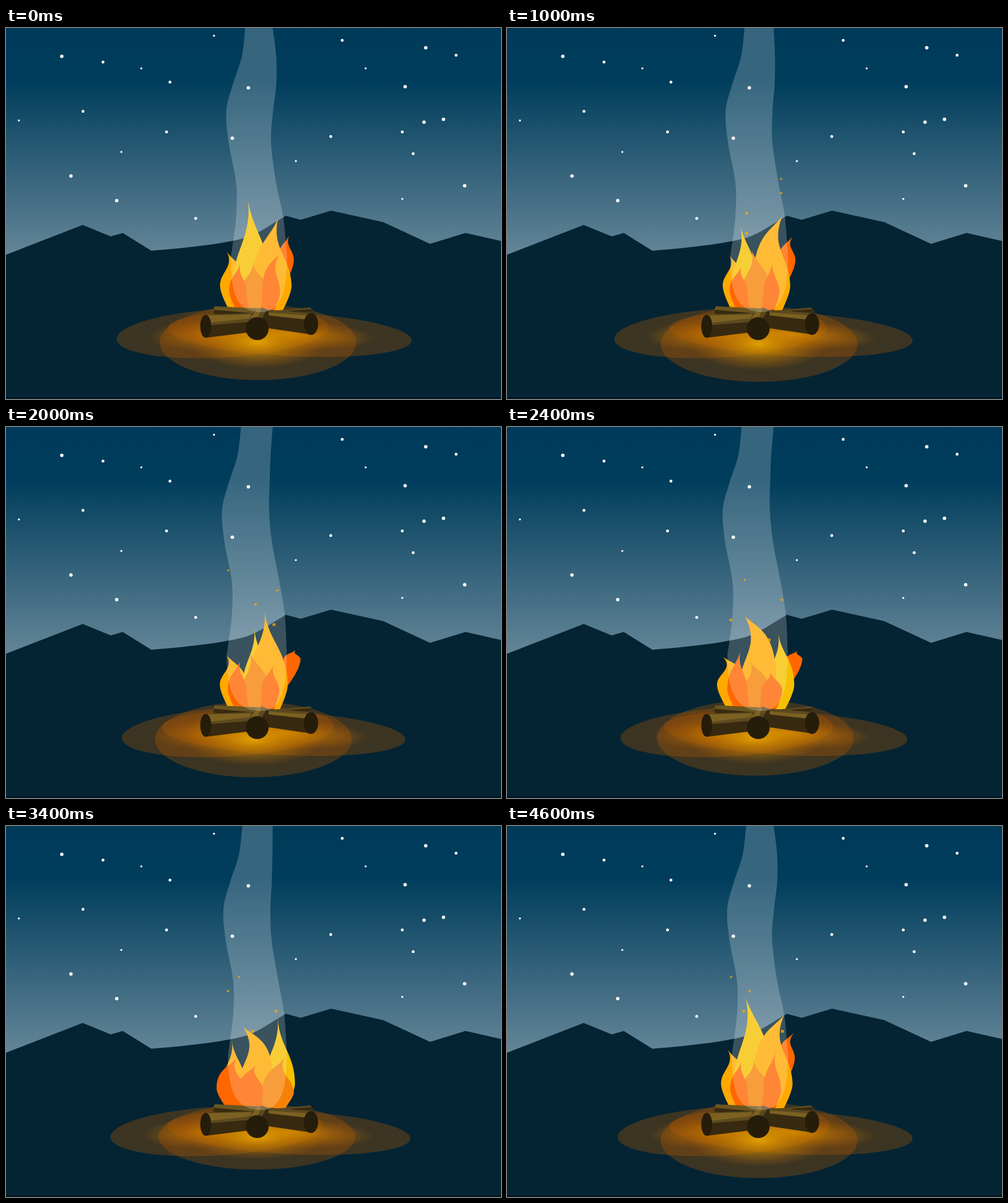
Write an HTML page with a canvas that moves like this. It is 865x648 px and loops after 4800 ms.

```html
<!DOCTYPE html>
<html lang="en">
<head>
<meta charset="utf-8">
<title>Campfire at night</title>
<style>
html, body { margin: 0; width: 100%; height: 100%; overflow: hidden; background: #042433; }
canvas { display: block; }
</style>
</head>
<body>
<canvas id="stage" width="865" height="648"></canvas>
<script>
const ctx = document.getElementById('stage').getContext('2d');
const LOOP = 4800, STEP = 200, BASE = 493, CENTRE = 438;

// Back to front: height of the widest part, pull of the foot towards the centre, tip flicker
const FLAMES = [
  { color: '#ff6600', belly: 405, foot: 0.75, flicker: 3 },
  { color: '#ffa900', belly: 450, foot: 0.25, flicker: 0 },
  { color: '#f6c000', belly: 450, foot: 0.25, flicker: -3 },
  { color: '#ffa900', belly: 450, foot: 0.25, flicker: 4 },
  { color: '#f58207', belly: 465, foot: 0.25, flicker: 0 },
  { color: '#ff6600', belly: 458, foot: 0.25, flicker: 0 },
  { color: '#ff6600', belly: 460, foot: 0.25, flicker: -4 }
];

// Each flame: tip x, tip y, left and right extent
const tall = [[498, 362, 474, 503], [386, 391, 374, 420], [420, 299, 396, 462], [480, 331, 430, 499],
  [431, 408, 405, 462], [410, 411, 390, 420], [474, 395, 448, 479]];
const low = [[496, 365, 474, 504], [389, 397, 377, 420], [411, 346, 393, 438], [477, 329, 430, 495],
  [427, 387, 408, 462], [410, 416, 389, 420], [468, 409, 448, 476]];
const reach = Object.assign([...low], { 0: [509, 389, 484, 514], 3: [474, 316, 426, 503] });
const curl = [[511, 391, 488, 516], [378, 402, 367, 420], [471, 361, 455, 502], [420, 331, 407, 471],
  [424, 409, 410, 460], [408, 391, 385, 420], [456, 427, 444, 481]];
const round = [[478, 400, 470, 488], [395, 376, 378, 418], [478, 337, 450, 505], [411, 352, 408, 467],
  [487, 405, 447, 503], [404, 405, 368, 415], [441, 417, 405, 449]];

// Glow: left tip, right tip, front pool centre and height
const POSES = {
  tall: { fire: tall, glow: [193, 709, 440.5, 549, 66] },
  low: { fire: low, glow: [187, 709, 440.5, 552, 66] },
  lean: { fire: low, glow: [204, 707, 436, 547.5, 66] },
  reach: { fire: reach, glow: [204, 697, 431.5, 547, 66] },
  curl: { fire: curl, glow: [198, 700, 434, 543, 66] },
  round: { fire: round, glow: [182, 707, 438.5, 543, 57] }
};
const TIMELINE = [[0, 'tall'], [600, 'tall'], [1000, 'low'], [1600, 'lean'], [1800, 'reach'],
  [2400, 'curl'], [2600, 'curl'], [3000, 'round'], [3400, 'round'], [3800, 'curl'], [4000, 'reach'],
  [4200, 'lean'], [4400, 'low'], [4600, 'tall'], [LOOP, 'tall']];

const STARS = [
  [1.8, [[236, 70], [363, 13], [22, 161], [201, 216], [506, 232], [628, 70], [692, 298]]],
  [2.5, [[169, 59], [286, 94], [134, 145], [280, 181], [331, 332], [587, 21], [786, 47], [692, 181],
    [567, 189], [711, 219]]],
  [3, [[97, 49], [113, 258], [193, 301], [423, 104], [395, 192], [733, 34], [697, 102], [764, 159],
    [730, 164], [801, 275]]]
];

const fill = (color, path) => { ctx.fillStyle = color; ctx.fill(new Path2D(path)); };
const poly = (color, points) => fill(color, `M${points}Z`);
function oval(color, x, y, rx, ry = rx) {
  ctx.fillStyle = color;
  ctx.beginPath();
  ctx.ellipse(x, y, rx, ry, 0, 0, 7);
  ctx.fill();
}

const sky = ctx.createLinearGradient(0, 0, 0, 400);
sky.addColorStop(0, '#003a5a');
sky.addColorStop(0.23, '#003d5c');
sky.addColorStop(1, '#658698');

const light = ctx.createRadialGradient(0, 0, 0, 0, 0, 1);
light.addColorStop(0, 'rgba(224,160,0,1)');
light.addColorStop(0.7, 'rgba(175,86,0,.33)');
light.addColorStop(1, 'rgba(175,86,0,.33)');

function drawScenery() {
  ctx.fillStyle = sky;
  ctx.fillRect(0, 0, 865, 648);
  for (const [r, places] of STARS) {
    for (const [x, y] of places) oval('#fff', x + 0.5, y + 0.5, r);
  }
  fill('#042433', `M0 396L134 344 183 364 204 358 254 389C330 383 390 375 420 366
    C445 357 460 345 489 328L515 335 568 319 659 339 741 377 803 358 865 372V648H0Z`);
  ctx.fillStyle = '#021722';
  ctx.fillRect(0, 645, 865, 3);
}

function pool(x, y, rx, ry, angle) {
  ctx.save();
  ctx.translate(x, y);
  ctx.rotate(angle);
  ctx.scale(rx, ry);
  oval(light, 0, 0, 1);
  ctx.restore();
}

function drawGlow([left, right, x, y, height]) {
  pool(left + 186, 533, 186, 42.5, -0.058);
  pool(right - 213, 535, 213, 38, 0.052);
  pool(x, y, 172, height, 0);
}

// The tip curls away from the middle; the outer side of the curl is rounder
function drawFlame([tipX, tipY, left, right], { color, belly, foot }) {
  const height = belly - tipY, bend = 1.2 * (tipX - (left + right) / 2);
  const side = (x, sign) => {
    const bulge = Math.min(1, Math.max(0, sign * bend / 25));
    return {
      x,
      foot: x + (CENTRE - x) * foot,
      footY: belly + 0.3 * (BASE - belly),
      rise: belly - height * (0.4 + 0.35 * bulge),
      drop: tipY + height * (0.45 - 0.25 * bulge)
    };
  };
  const l = side(left, 1), r = side(right, -1), neck = tipX - bend;
  fill(color, `M${l.foot} ${BASE}Q${left} ${l.footY} ${left} ${belly}
    C${left} ${l.rise} ${neck} ${l.drop} ${tipX} ${tipY}
    C${neck} ${r.drop} ${right} ${r.rise} ${right} ${belly}
    Q${right} ${r.footY} ${r.foot} ${BASE}Z`);
}

function drawLogs() {
  // back pair
  poly('#5c4a1e', '478 493 531 488 538 495 510 500');
  poly('#382a10', '495 494 533 491 538 495 510 500');
  poly('#382a10', '365 486 440 492 440 510 362 499');
  poly('#6b5520', '365 486 447 490 440 499 362 492');
  // left
  poly('#382a10', '349 501 430 498 430 531 350 541');
  poly('#5c4a1e', '349 501 430 498 430 513 357 519');
  poly('#7c6122', '349 502 430 500 425 507 356 515');
  oval('#261c0a', 349, 521, 9.5, 20);
  // right
  poly('#382a10', '457 492 535 498 531 535 456 524');
  poly('#5c4a1e', '457 492 535 498 524 506 457 500');
  poly('#7c6122', '459 497 527 502 522 509 459 502');
  oval('#261c0a', 533, 517, 12.5, 19);
  // front
  poly('#5c4a1e', '419 523 435 493 447 488 459 493 459 524');
  poly('#7c6122', '425 511 438 491 447 489 440 506');
  poly('#382a10', '448 506 455 493 459 495 459 522');
  oval('#261c0a', 439, 525, 20);
}

// Smooth curve through points, appended to the current path
function curve(points) {
  points.forEach(([x, y], i) => {
    if (!i) return ctx.lineTo(x, y);
    const before = points[i - 2] || points[0], from = points[i - 1], after = points[i + 1] || points[i];
    ctx.bezierCurveTo(from[0] + (x - before[0]) / 6, from[1] + (y - before[1]) / 6,
      x - (after[0] - from[0]) / 6, y - (after[1] - from[1]) / 6, x, y);
  });
}

function drawSmoke(time) {
  const drift = Math.cos(2 * Math.PI * time / LOOP);
  const ripple = y => 8 * Math.sin(Math.PI * y / 190) * (1 - y / 450);
  const left = [[414, 0], [408, 50], [392, 100], [381, 145], [385, 200], [398, 270], [398, 330], [389, 400]]
    .map(([x, y]) => [x + 4 * drift, y]);
  const right = [[466, 0], [467, 50], [466, 100], [463, 145], [464, 200], [475, 270], [486, 330], [491, 400]]
    .map(([x, y]) => [x + drift * ripple(y), y]);
  ctx.fillStyle = 'rgba(255,255,255,.21)';
  ctx.beginPath();
  curve(right);
  ctx.bezierCurveTo(right[7][0], 470, 475, 496, 447, 496);
  ctx.bezierCurveTo(405, 496, left[7][0], 470, ...left[7]);
  curve(left.reverse());
  ctx.fill();
}

function drawSparks(time) {
  if (time < 600) return;
  for (let i = 0; i < 4; i++) {
    const life = (time / 1200 + i * 0.27) % 1;
    const x = 436 + 48 * Math.sin(i * 2.4 + time / 900);
    oval('rgba(255,169,0,.75)', x, 372 - 130 * life, 3 - 1.3 * life);
  }
}

function draw(time) {
  const next = TIMELINE.findIndex(key => key[0] > time);
  const [start, from] = TIMELINE[next - 1], [end, to] = TIMELINE[next];
  const k = (time - start) / (end - start), a = POSES[from], b = POSES[to];
  const mix = (p, q) => p.map((v, i) => v + (q[i] - v) * k);
  const beat = time / STEP % 2 ? 1 : -1;

  drawScenery();
  drawGlow(mix(a.glow, b.glow));
  FLAMES.forEach((flame, i) => {
    const shape = mix(a.fire[i], b.fire[i]);
    shape[0] += beat * flame.flicker;
    drawFlame(shape, flame);
  });
  drawLogs();
  drawSmoke(time);
  drawSparks(time);
}

function tick() {
  draw(Math.floor(performance.now() % LOOP / STEP) * STEP);
  requestAnimationFrame(tick);
}
tick();
</script>
</body>
</html>
```
